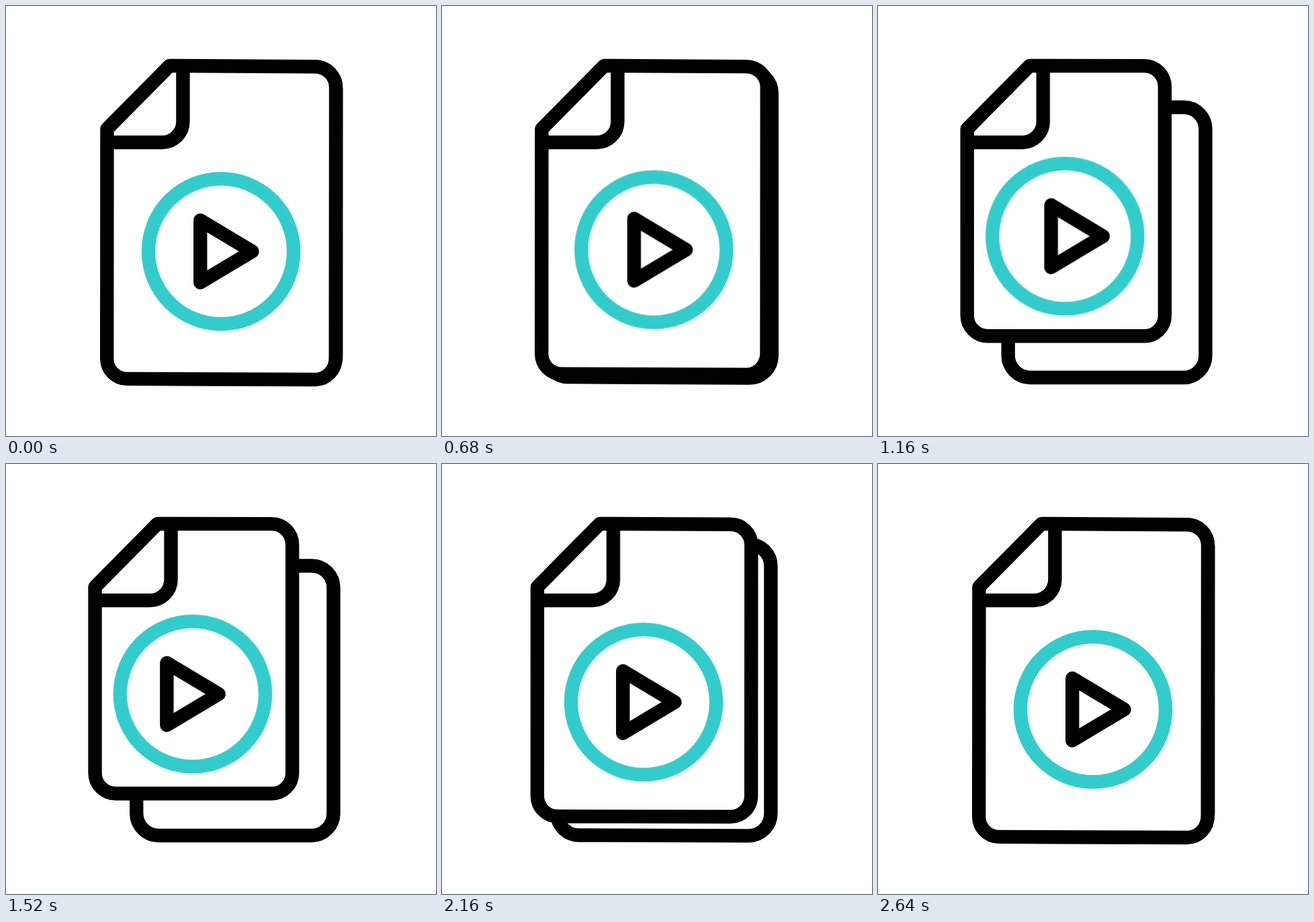
An HTML page without scripts that plays this animation: 640x640 px, repeating every 3 s.

```html
<!DOCTYPE html>
<html lang="en">
<head>
<meta charset="utf-8">
<title>Video file icon</title>
<style>
  html, body { margin: 0; width: 100%; height: 100%; overflow: hidden; background: #fff; }
  svg { display: block; width: 100%; height: 100%; }

  path, circle {
    fill: none;
    stroke: #000;
    stroke-width: 20.4;
    stroke-linejoin: round;
  }
  .front { fill: #fff; }
  .badge circle { stroke: #33cccc; }

  .front, .back, .fold, .badge, .play { animation: 3s infinite; }
  .front { animation-name: front; }
  .back { animation-name: back; }
  .fold { animation-name: shift; --shift: -17.9px, 0px; }
  .badge { animation-name: shift; --shift: -42.2px, -22.9px; }
  .play { animation-name: sway; animation-timing-function: cubic-bezier(.33, 0, .67, 1); }

  /* The front page shrinks to the upper left while the back page slides out */
  @keyframes front {
    0%, 16%, 88%, 100% {
      d: path("M150.4 183 L243.4 89 L460 90.2 C477 90.2 491 104 491 121 L490.7 524 C490.7 542 477 556 460 556 L180 554.9 C163.5 554.9 150.2 541.5 150.2 525 Z");
      animation-timing-function: cubic-bezier(.58, 0, .15, 1);
    }
    42.667%, 61.333% {
      d: path("M132.5 183 L225.4 89 L395.5 89.1 C412.5 89.1 426.1 103 426.1 120 L426.1 460 C426.1 477 412.5 490.5 395.5 490.5 L163.5 490.5 C146.5 490.5 132.5 477 132.5 460 Z");
      animation-timing-function: cubic-bezier(.49, 0, .22, 1);
    }
  }
  @keyframes back {
    0%, 16%, 88%, 100% {
      d: path("M150.5 450 L150.5 519.5 C150.5 537.5 164.5 551.9 182.5 552 L457.5 553.7 C476 553.7 491.2 539 491.2 520.5 L491.2 123 C491.2 105 477 90.5 459 90.5 L350 90.5");
      animation-timing-function: cubic-bezier(.58, 0, .15, 1);
    }
    42.667%, 61.333% {
      d: path("M194.2 450 L194.2 520 C194.2 538 209 553 227 553 L455 553 C473 553 487.4 538 487.4 520 L487.4 184 C487.4 166 473 151.5 455 151.5 L350 151.5");
      animation-timing-function: cubic-bezier(.49, 0, .22, 1);
    }
  }
  @keyframes shift {
    0%, 16%, 88%, 100% {
      transform: translate(0px, 0px);
      animation-timing-function: cubic-bezier(.58, 0, .15, 1);
    }
    42.667%, 61.333% {
      transform: translate(var(--shift));
      animation-timing-function: cubic-bezier(.49, 0, .22, 1);
    }
  }
  /* The play sign lags behind, overshoots and settles */
  @keyframes sway {
    0%, 21.4%, 60%, 100% { transform: translateX(0px); }
    30.667% { transform: translateX(25.3px); }
    48% { transform: translateX(-8.8px); }
  }
</style>
</head>
<body>
<svg viewBox="0 0 640 640">
  <path class="back"/>
  <path class="front"/>
  <path class="fold" d="M263.4 89 V172 C263.4 189 249.5 203 232.5 203 H150.4"/>
  <g class="badge">
    <circle cx="320" cy="365.2" r="108.1"/>
    <path class="play" d="M289.2 319 L366.5 365.3 L289.2 411.6 Z"/>
  </g>
</svg>
</body>
</html>
```
